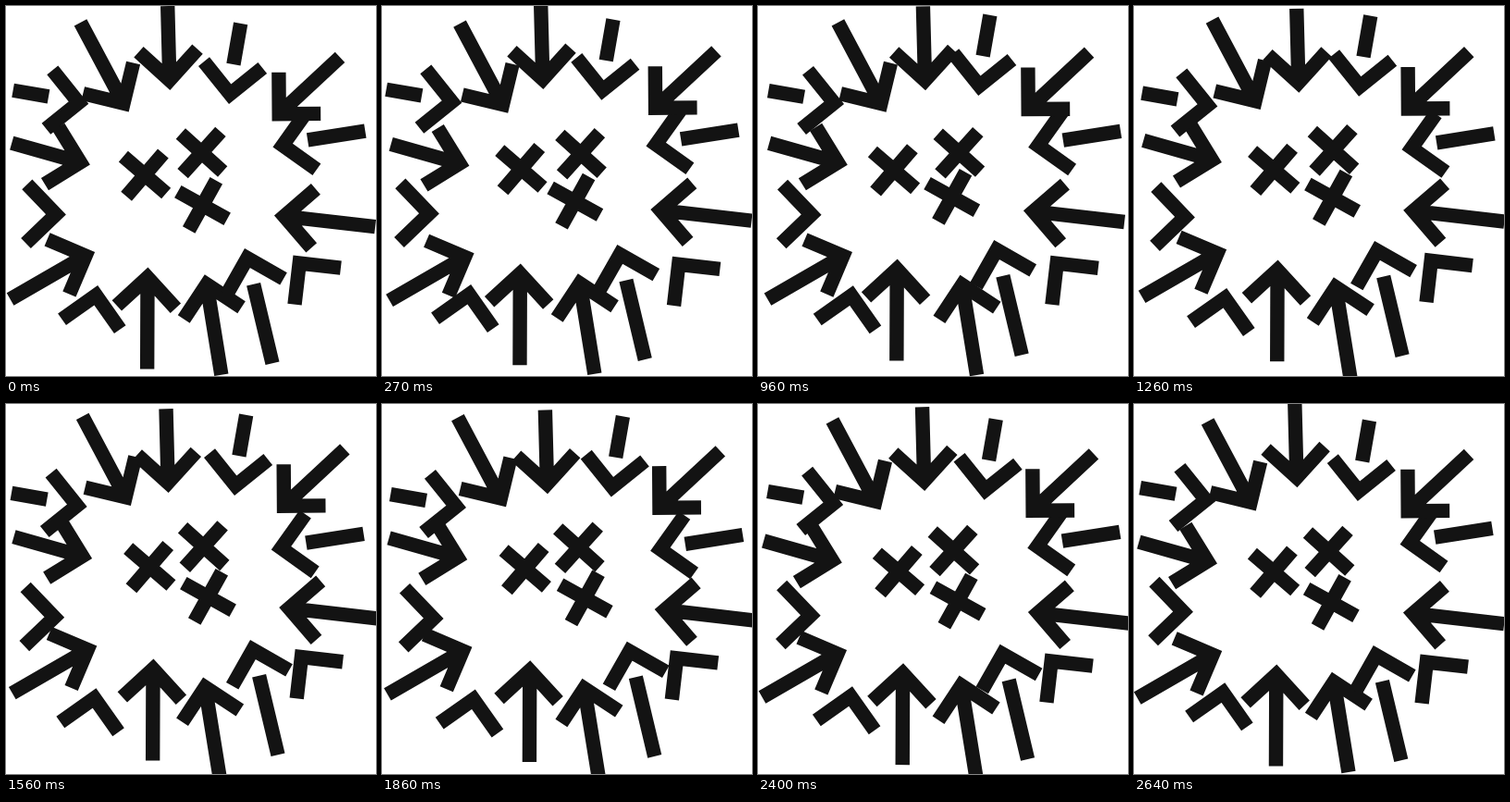
An HTML page for the animation above (2670 ms loop, 400x400 px).

```html
<!DOCTYPE html>
<html lang="en">
<head>
<meta charset="utf-8">
<title>Jittering arrows</title>
<style>
  html, body { margin: 0; height: 100%; overflow: hidden; background: #fff; }
  svg { display: block; width: 100vw; height: 100vh; }
  path { fill: none; stroke: #131313; stroke-width: 15.4; stroke-miterlimit: 10; }
</style>
</head>
<body>
<svg viewBox="0 0 400 400"></svg>
<script>
const LOOP = 2670, STEP = 30, ARM = 45, BAR = 61;
const TIMES = [0, 270, 600, 960, 1560, 2160, 2640];

// Angles are in degrees, clockwise from the right.
function polar(x, y, deg, r) {
  const a = deg * Math.PI / 180;
  return `${x + r * Math.cos(a)} ${y + r * Math.sin(a)}`;
}
const dash = (x, y, deg, length) =>
  `M${polar(x, y, deg, -length / 2)}L${polar(x, y, deg, length / 2)}`;
const cross = (x, y, deg) => dash(x, y, deg, BAR) + dash(x, y, deg + 90, BAR);
const chevron = (x, y, deg) =>
  `M${polar(x, y, deg - 45, ARM)}L${x} ${y}L${polar(x, y, deg + 45, ARM)}`;
const arrow = (x, y, deg, length = 99, tilt = 2.4) =>
  chevron(x, y, deg) + `M${x} ${y}L${polar(x, y, deg + tilt, length)}`;

// Each layer drifts as one piece, starting at rest and passing these offsets.
const layers = [
  {
    shapes: [
      arrow(127, 105.2, 238.6, 99, 3.4),
      arrow(80.3, 169, 193.4, 77),
      arrow(86, 270, 158, 94, -8),
      chevron(317.2, 278, 51.6),
      cross(211.5, 158.5, 42),
    ],
    drift: [[3.5, 1.3], [6.8, 3.2], [5.9, .2], [2.2, -4.4], [.7, -1.1], [-.9, 1]],
  },
  {
    shapes: [
      arrow(176.8, 80, 267.2, 80, 1.3),
      arrow(217, 301, 78.4),
      chevron(78.5, 104.5, 186.2),
      chevron(54, 225.3, 181.2),
      chevron(97.3, 312.8, 99.8),
      chevron(299.2, 150.6, -9.6),
      dash(26.8, 94.6, 9.9, 39),
      dash(357.2, 140, -9, 63),
    ],
    drift: [[-3, -1], [-3.2, -1], [3.7, .3], [-1.7, 5.2], [5, 6.1], [-.9, -.7]],
  },
  {
    shapes: [
      arrow(153, 293.5, 92.5, 99, -2.3),
      chevron(260.9, 272.6, 74.6),
      chevron(242.2, 95.2, 276.2),
      dash(277.8, 343.5, 76.6, 88),
      dash(249.8, 41, 99.9, 45),
      cross(212.5, 215.4, 29),
    ],
    drift: [[-3.7, -4.2], [-7, -9], [-2.8, -9], [6, -7], [5.7, -3.7], [.8, -1]],
  },
  {
    shapes: [
      arrow(300.8, 227.3, 4.2),
      arrow(295.2, 116.7, -45.4, 90),
      cross(150, 182.6, 40.7),
    ],
    drift: [[.4, -6.5], [-.3, -11.3], [-3, -5.2], [5.3, -6.5], [2.9, -2.2], [1, -1]],
  },
];

const svg = document.querySelector('svg');
for (const layer of layers) {
  layer.stops = [[0, 0], ...layer.drift];
  layer.path = document.createElementNS(svg.namespaceURI, 'path');
  layer.path.setAttribute('d', layer.shapes.join(''));
  svg.append(layer.path);
}

// Smooth cubic through the stops; axis 0 is x, axis 1 is y.
function offset(stops, t, axis) {
  const last = TIMES.length - 1;
  const i = TIMES.findIndex(time => time >= t && time > 0) - 1;
  const slope = k => {
    const a = Math.max(0, k - 1), b = Math.min(last, k + 1);
    return (stops[b][axis] - stops[a][axis]) / (TIMES[b] - TIMES[a]);
  };
  const span = TIMES[i + 1] - TIMES[i];
  const u = (t - TIMES[i]) / span, v = 1 - u;
  return v * v * ((1 + 2 * u) * stops[i][axis] + u * span * slope(i))
       + u * u * ((1 + 2 * v) * stops[i + 1][axis] - v * span * slope(i + 1));
}

function draw() {
  const t = Math.floor(performance.now() % LOOP / STEP) * STEP;
  for (const { path, stops } of layers) {
    path.setAttribute('transform', `translate(${offset(stops, t, 0)} ${offset(stops, t, 1)})`);
  }
  requestAnimationFrame(draw);
}
draw();
</script>
</body>
</html>
```
